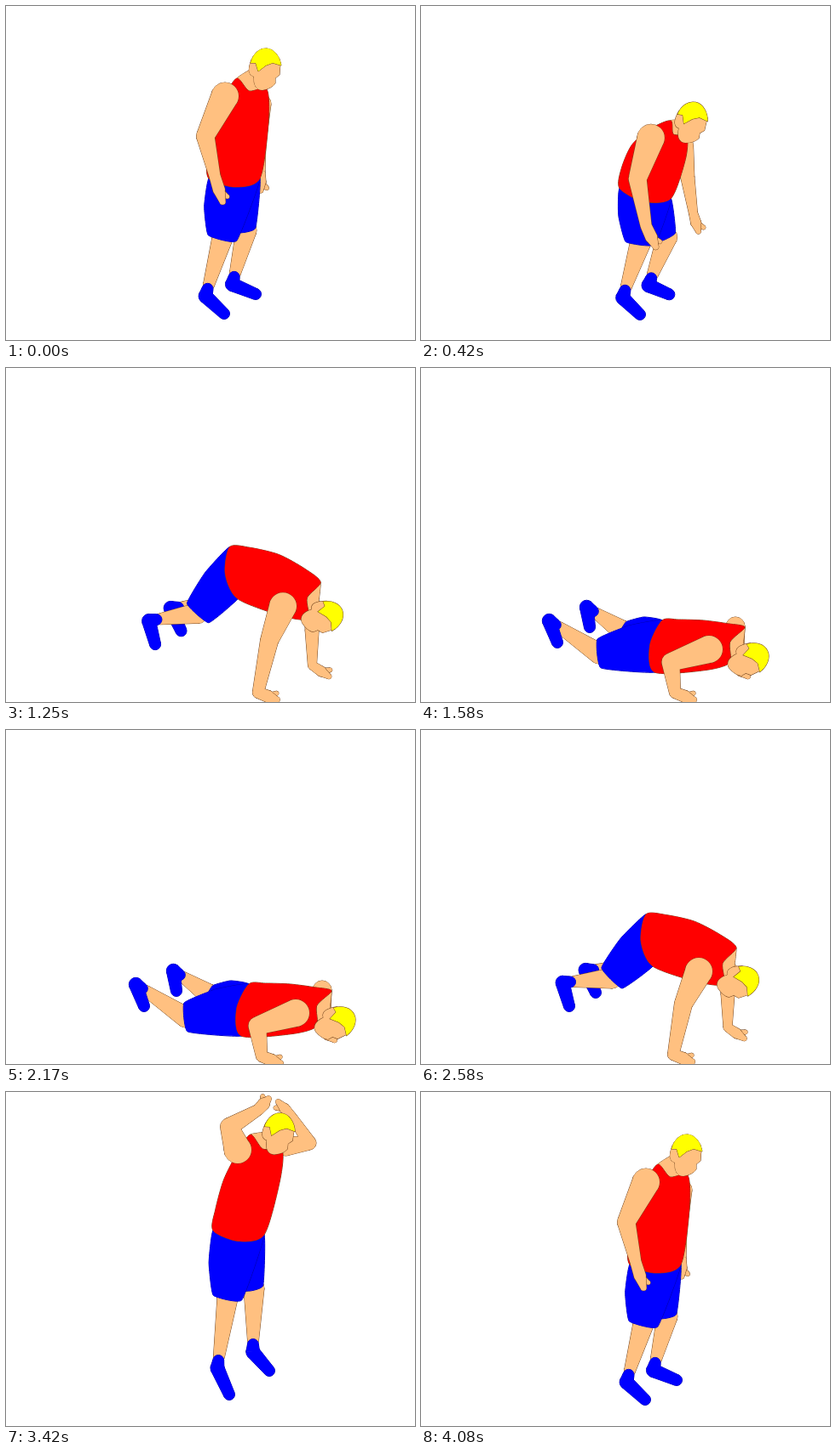
An HTML page with a canvas for the animation above (4.16 s loop, 480 by 393 pixels).

```html
<!DOCTYPE html>
<html>
<head>
<meta charset="utf-8">
<style>
html, body { margin: 0; width: 100%; height: 100%; overflow: hidden; background: #fff; }
canvas { display: block; }
</style>
</head>
<body>
<canvas id="stage" width="480" height="393"></canvas>
<script>
const ctx = document.getElementById('stage').getContext('2d');
const SKIN = '#ffc080', RED = '#f00', BLUE = '#00f', YELLOW = '#ff0';
const LOOP = 4160, STEP = 1000 / 12;

const HAIR = new Path2D('M-18-5 A18.5 24 0 0 1 18-2 L8-5 0-2 -9 5 -12-5Z');
const FACE = new Path2D('M-17-9 Q-24 9 -14 11 Q-15 27 -4 27 Q7 25 11 19 L11 13 16 9 17-6Z');

// torso: neck back, neck front, hem front, hem back; arms: shoulder, elbow, wrist, tip;
// legs: knee, ankle, toe; bend: head angle in degrees, rounding of the back.
const stand = {
  torso: [271,85, 306,98, 298,203, 238,203], bend: [0, 13], head: [305,72],
  nearArm: [257,106, 234,153, 245,200, 255,233], farArm: [300,115, 297,160, 299,195, 299,219],
  nearLeg: [254,273, 238,328, 256,362], farLeg: [282,264, 269,314, 293,339]
};
const crouch = {
  torso: [338,236, 324,268, 284,274, 223,238], bend: [27, 32], head: [345,263],
  nearArm: [296,255, 295,305, 303,378, 320,392], farArm: [326,265, 345,285, 361,342, 381,365],
  nearLeg: [264,292, 247,334, 259,365], farLeg: [302,288, 278,319, 288,340]
};
const plank = {
  torso: [370,256, 355,299, 272,278, 264,217], bend: [68, 12], head: [375,297],
  nearArm: [326,284, 308,322, 296,382, 320,391], farArm: [362,285, 360,310, 360,350, 381,364],
  nearLeg: [224,292, 180,296, 174,325], farLeg: [244,281, 207,282, 205,309]
};
const low = {
  torso: [380,305, 362,347, 274,358, 283,297], bend: [60, 4], head: [387,343],
  nearArm: [338,331, 293,346, 298,382, 322,391], farArm: [369,304, 371,330, 367,350, 385,364],
  nearLeg: [209,336, 162,305, 160,323], farLeg: [236,309, 206,289, 198,305]
};
const jump = {
  torso: [287,50, 324,68, 303,168, 243,163], bend: [5, 10], head: [321,47],
  nearArm: [272,68, 262,41, 296,21, 309,7], farArm: [328,64, 356,60, 336,29, 318,10],
  nearLeg: [260,242, 250,311, 262,356], farLeg: [291,231, 290,292, 309,328]
};

const mapPose = (pose, change) =>
  Object.fromEntries(Object.entries(pose).map(([name, v]) => [name, v.map((n, i) => change(n, i, name))]));
const mix = (a, b, t) => mapPose(a, (n, i, name) => n + (b[name][i] - n) * t);
const shift = (pose, dx, dy) =>
  mapPose(pose, (n, i, name) => name === 'bend' ? n : n + (i % 2 ? dy : dx));

const keys = [
  [0, stand], [4, mix(stand, crouch, 0.22)], [7, mix(stand, crouch, 0.55)], [10, crouch],
  [14, mix(low, plank, 1.35)], [19, low], [26, shift(low, 2, 2)], [31, plank],
  [35, mix(crouch, stand, 0.08)], [41, jump], [49, shift(stand, 7, 0)], [50, stand]
];

function poseAt(step) {
  const next = keys.findIndex(([start]) => start > step);
  const [from, a] = keys[next - 1], [to, b] = keys[next];
  return mix(a, b, (step - from) / (to - from));
}

const pairs = list => list.flatMap((n, i) => i % 2 ? [] : [[n, list[i + 1]]]);

// Point on the way from a to b, pushed sideways by the given distance.
function bow(a, b, u, push = 0) {
  const dx = b[0] - a[0], dy = b[1] - a[1], len = Math.hypot(dx, dy) || 1;
  return [a[0] + dx * u + dy / len * push, a[1] + dy * u - dx / len * push];
}

function beyond(a, b, distance) {
  return bow(a, b, 1 + distance / (Math.hypot(b[0] - a[0], b[1] - a[1]) || 1));
}

function paint(path, color) {
  ctx.strokeStyle = color === BLUE ? '#00a' : '#70421c';
  ctx.lineWidth = 1;
  ctx.stroke(path);
  ctx.fillStyle = color;
  ctx.fill(path);
}

function blob(points, color, bend = 0.13) {
  const path = new Path2D(), at = i => points.at(i % points.length);
  path.moveTo(...at(0));
  points.forEach((b, i) => {
    const a = at(i - 1), c = at(i + 1), d = at(i + 2);
    path.bezierCurveTo(b[0] + (c[0] - a[0]) * bend, b[1] + (c[1] - a[1]) * bend,
      c[0] - (d[0] - b[0]) * bend, c[1] - (d[1] - b[1]) * bend, ...c);
  });
  paint(path, color);
}

// Chain of tapered capsules through the points.
function limb(points, radii, color) {
  const path = new Path2D();
  points.forEach((a, i) => {
    const r = radii[i], b = points[i + 1], r2 = radii[i + 1];
    path.moveTo(a[0] + r, a[1]);
    path.arc(...a, r, 0, 7);
    if (!b) return;
    path.moveTo(...bow(a, b, 0, r));
    path.lineTo(...bow(a, b, 1, r2));
    path.lineTo(...bow(a, b, 1, -r2));
    path.lineTo(...bow(a, b, 0, -r));
    path.closePath();
  });
  paint(path, color);
}

function arm(joints, radii) {
  const [shoulder, elbow, wrist, tip] = pairs(joints);
  const palm = bow(wrist, tip, 0.5);
  limb([palm, bow(wrist, tip, 0.8, 7)], [4, 2.5], SKIN);
  limb([shoulder, elbow, wrist, palm, bow(wrist, tip, 0.92)], radii, SKIN);
}

function leg(joints) {
  const [knee, ankle, toe] = pairs(joints);
  limb([knee, ankle], [12, 6.5], SKIN);
  limb([beyond(knee, ankle, 5), beyond(knee, ankle, 14), toe], [6.5, 8, 6.5], BLUE);
}

function trouserLeg(hemBack, hemFront, joints, width) {
  const knee = joints.slice(0, 2), hip = bow(hemBack, hemFront, 0.5);
  const back = bow(hip, knee, 1, -width), front = bow(hip, knee, 1, width);
  blob([hemFront, bow(hemBack, hemFront, 0.5, 12), hemBack,
    bow(hemBack, back, 0.5, -5), back, front], BLUE, 0.06);
}

function draw(step) {
  const p = poseAt(step);
  const [neckBack, neckFront, hemFront, hemBack] = pairs(p.torso);
  const [degrees, hump] = p.bend, [hx, hy] = p.head;
  const angle = degrees * Math.PI / 180, cos = Math.cos(angle), sin = Math.sin(angle);
  const onHead = (x, y) => [hx + x * cos - y * sin, hy + x * sin + y * cos];
  const scoop = bow(neckBack, neckFront, 0.5, -9);
  const spine = [0.2, 0.5, 0.8].map(u => bow(hemBack, neckBack, u, hump * 4 * u * (1 - u)));

  ctx.fillStyle = '#fff';
  ctx.fillRect(0, 0, 480, 393);
  arm(p.farArm, [11, 8, 5, 6, 3]);
  leg(p.farLeg);
  leg(p.nearLeg);
  trouserLeg(hemBack, hemFront, p.farLeg, 11);
  trouserLeg(hemBack, hemFront, p.nearLeg, 17);
  blob([neckBack, scoop, neckFront, onHead(5, 18), onHead(-16, 2)], SKIN, 0.04);
  blob([neckBack, scoop, neckFront, bow(neckFront, hemFront, 0.35, 5), hemFront,
    bow(hemFront, hemBack, 0.5, 10), hemBack, ...spine], RED);
  arm(p.nearArm, [16, 10.5, 6.5, 7, 3.5]);

  ctx.save();
  ctx.translate(hx, hy);
  ctx.rotate(angle);
  paint(FACE, SKIN);
  paint(HAIR, YELLOW);
  ctx.restore();
}

function tick() {
  draw(Math.floor((performance.now() % LOOP + 5) / STEP));
  requestAnimationFrame(tick);
}
tick();
</script>
</body>
</html>
```
